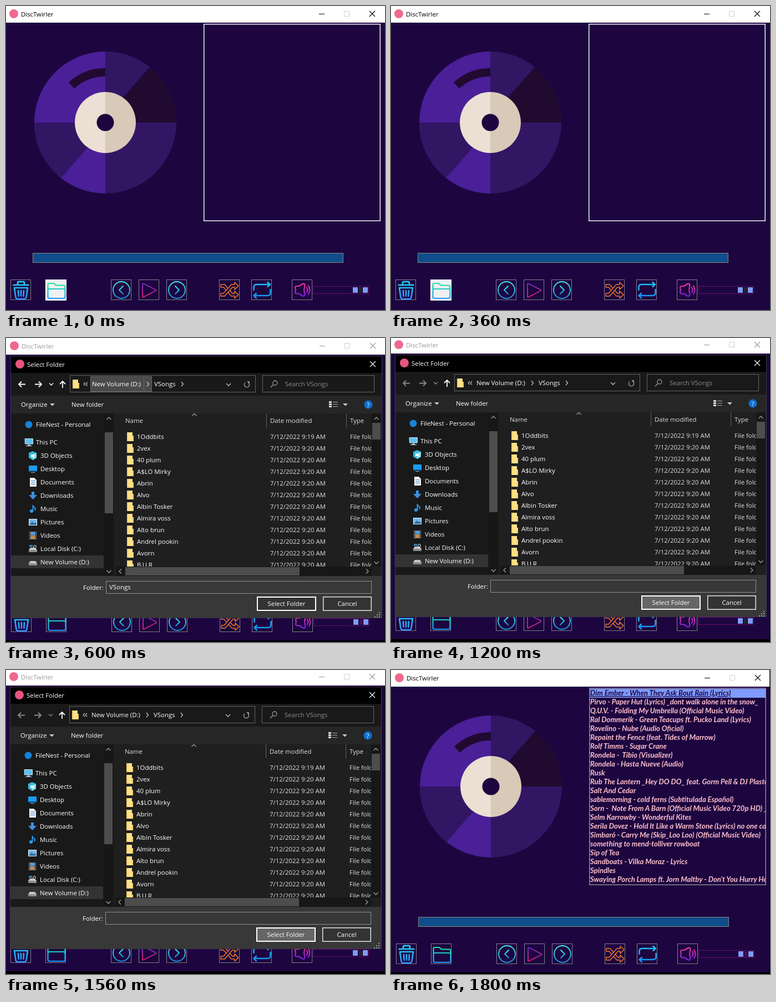
Write an HTML page that moves like this. It is 683 by 548 pixels and loops after 2.4 s.

```html
<!DOCTYPE html>
<html lang="en">
<head>
<meta charset="utf-8">
<title>Disc player</title>
<style>
html, body { margin: 0; width: 100%; height: 100%; overflow: hidden; background: #1d0640; }
svg { display: block; width: 683px; height: 548px; }
text { font: 11.4px "Open Sans", "Noto Sans", sans-serif; white-space: pre; }
.song { font: italic bold 13.1px Lato, "Open Sans", sans-serif; fill: #ffc0cb; }
</style>
</head>
<body>
<svg id="stage" viewBox="0 0 683 548"></svg>
<script>
const BG = '#1d0640', APP = 'DiscTwirler', DIR = 'VSongs';

const rect = (x, y, w, h, fill, more = '') =>
  `<rect x="${x}" y="${y}" width="${w}" height="${h}" fill="${fill}" ${more}/>`;
const box = (x, y, w, h, fill, stroke, sw = 1, more = '') =>
  rect(x + sw / 2, y + sw / 2, w - sw, h - sw, fill, `stroke="${stroke}" stroke-width="${sw}" ${more}`);
const text = (x, y, s, fill = '#fff', more = '') =>
  `<text x="${x}" y="${y}" fill="${fill}" ${more}>${s.replace(/&/g, '&amp;')}</text>`;
const line = (d, stroke = '#fff', w = 1, more = '') =>
  `<path d="${d}" fill="none" stroke="${stroke}" stroke-width="${w}" ${more}/>`;
const shape = (d, fill, more = '') => `<path d="${d}" fill="${fill}" ${more}/>`;
const disc = (x, y, r, fill, more = '') => `<circle cx="${x}" cy="${y}" r="${r}" fill="${fill}" ${more}/>`;
const group = (id, ...parts) => `<g id="${id}">${parts.join('')}</g>`;
const grad = (id, a, b, dir = 'x2="0" y2="1"') =>
  `<linearGradient id="${id}" ${dir}><stop stop-color="${a}"/><stop offset="1" stop-color="${b}"/></linearGradient>`;
const round = 'stroke-linecap="round" stroke-linejoin="round"';

const defs = '<defs>' +
  grad('aqua', '#22d8ee', '#2f8dff') +
  grad('mint', '#1fe8a0', '#1b9cff') +
  grad('ring', '#45efe6', '#1c8fe2') +
  grad('plum', '#7430cc', '#e8206c') +
  grad('fire', '#ee4a2c', '#f9a826', 'x2="1" y2="1"') +
  grad('sky', '#1fc4f4', '#1590ee') +
  grad('rose', '#f5358e', '#7a1fe0') +
  '<clipPath id="songClip"><rect x="357" y="34" width="317" height="352"/></clipPath>' +
  '<clipPath id="rowClip"><rect x="198" y="164" width="461" height="248"/></clipPath></defs>';

// Record
const CX = 179, CY = 210;
const polar = (r, a) => {
  const t = a * Math.PI / 180;
  return `${(CX + r * Math.cos(t)).toFixed(2)} ${(CY + r * Math.sin(t)).toFixed(2)}`;
};
const sector = (r, a, b, fill, r0 = 0) => shape(
  `M${polar(r0, a)}L${polar(r, a)}A${r} ${r} 0 0 1 ${polar(r, b)}L${polar(r0, b)}` +
  (r0 ? `A${r0} ${r0} 0 0 0 ${polar(r0, a)}` : '') + 'Z', fill);
const wedge = (fill, turn) => shape('M179 210L211 164.500L259 110A128 128 0 0 1 307 210Z', fill,
  `transform="rotate(${turn} ${CX} ${CY})"`);

function record() {
  const lilac = '#4a1f98', violet = '#311664', dark = '#200a30';
  return sector(128, 0, 90, violet) + sector(128, 90, 180, lilac) +
    sector(128, 180, 270, lilac) + sector(128, 270, 360, violet) +
    wedge(dark, 0) + wedge(violet, 180) +
    sector(98, 227.5, 270, dark, 83) +
    sector(55, 90, 270, '#ecdfd3') + sector(55, -90, 90, '#d9c9b8') + disc(CX, CY, 15.5, BG);
}

// Player controls
const frame = x => box(x, 493, 37, 37, BG, '#887f96') + line(`M${x + 1} 528.5H${x + 35.5}V494`, '#0c0220');
const ring = (x, s) => disc(x, 512, 15, 'none', 'stroke="url(#ring)" stroke-width="2"') +
  line(`M${x - 3 * s} 505l${7 * s} 7l${-7 * s} 7`, 'url(#ring)', 2, round);
const shuffleArm = (more = '') => shape(
  'M387 523H394L408 507H412V511L419 504.5L412 498V502H406L392 518H387Z', BG,
  `stroke="url(#fire)" stroke-width="1.4" stroke-linejoin="round" ${more}`);

function controls() {
  return [8, 71, 189, 239, 289, 384, 442, 515].map(frame).join('') +
    group('hot', box(71, 493, 38, 38, '#f0f0f0', '#fff')) +
    line('M13.5 503H40.5M21 503V499Q21 497 23 497H31Q33 497 33 499V503M15 508H39L36.5 525Q36 528 33 528H21Q18 528 17.5 525L15 508M22 513L22.6 523M27 513V523M32 513L31.4 523',
      'url(#aqua)', 2.6, round) +
    line('M75.5 510V502.5Q75.5 500 78 500H86L90 503.5H103.5Q106.5 503.5 106.5 506.5V524Q106.5 527 103.5 527H78.5Q75.5 527 75.5 524V512Q75.5 510 78 510H103Q106 510 106.3 512',
      'url(#mint)', 2.2, round) +
    ring(208, -1) + ring(308, 1) +
    line('M246 501.5Q246 499.5 248 500.5L269.5 511.5Q271 512.5 269.5 513.5L248 524.5Q246 525.5 246 523.5Z', 'url(#plum)', 1.9, round) +
    shuffleArm('transform="matrix(1 0 0 -1 0 1025)"') + shuffleArm() +
    line('M446.5 512V507Q446.5 502 451.5 502H475.5M471.5 498L476 502L471.5 506M476.5 511V517Q476.5 522 471.5 522H446.5M451 518L446.5 522L451 526.5',
      'url(#sky)', 2.5, round) +
    line('M524 505H528L534 501Q538.5 499.5 538.5 504L537 512L538.5 519Q538.5 524 534 522.5L528 518.5H524Q521 518.5 521 515.5L522 512L521 508Q521 505 524 505M542 507.5Q545 512 542 516M545 504.5Q550 512 545 519.5',
      'url(#rose)', 2.2, round) +
    box(553, 505, 101, 14, BG, '#6e0a70') +
    rect(624, 506, 29, 12, '#12042a') + rect(625, 507, 9, 10, '#7f9bff') + rect(643, 507, 9, 10, '#7f9bff') +
    group('grip', line('M636.5 507V517M638.5 507V517M640.5 507V517', 'inherit'));
}

const SONGS = `Dim Ember - When They Ask Bout Rain (Lyrics)
Pirvo - Paper Hut (Lyrics) _dont walk alone in the snow_
Q.U.V. - Folding My Umbrella (Official Music Video)
Ral Dommerik - Green Teacups ft. Pucko Land (Lyrics)
Rovelino - Nube (Audio Oficial)
Repaint the Fence (feat. Tides of Marrow)
Rolf Timms - Sugar Crane
Rondela -  Tibio (Visualizer)
Rondela - Hasta Nueve (Audio)
Rusk
Rub The Lantern _Hey DO DO_ feat. Gorm Pell & DJ Plaster (Official)
Salt And Cedar
sablemorning - cold ferns (Subtitulada Español)
Sorn -  Note From A Barn (Official Music Video 720p HD) _ Lyrics
Selm Karrowby - Wonderful Kites
Serila Dovez - Hold It Like a Warm Stone (Lyrics) no one can
Simbaró - Carry Me (Skip_Loo Loo) (Official Music Video)
something to mend-tolliver rowboat
Sip of Tea
Sandboats - Vilka Moraz - Lyrics
Spindles
Swaying Porch Lamps ft. Jorn Maltby - Don't You Hurry Home`.split('\n');

const songs = () => '<g clip-path="url(#songClip)">' + rect(358, 34, 316, 16, '#7f9bff') +
  SONGS.map((s, i) => text(358, 46 + 16 * i, s, '', 'class="song"' +
    (i ? '' : ` style="fill:${BG};text-decoration:underline"`)) +
    (i ? rect(357, 36 + 16 * i, 1, 3, '#c795a8') : '')).join('') + '</g>';

const player = () => group('win',
  rect(-2, -2, 690, 560, BG), rect(-2, -2, 690, 32, '#fff'),
  disc(14, 14, 8, '#f0698c'),
  group('caption', text(27, 19, APP, 'inherit')),
  line('M609.5 9.5H618.5V18.5H609.5Z', '#cfcfcf'),
  group('buttons', line('M564 14.5H574M655 9L665 19M665 9L655 19', 'inherit', 1.1)),
  record(),
  group('list', rect(356.75, 32.75, 317.5, 354.5, 'none', 'stroke-width="1.5"')),
  group('songs', songs()),
  box(48, 445, 560, 18, '#104e8b', '#86807c'),
  controls(),
  group('edge', rect(-2, 545, 690, 8, '#000')));

// Folder dialog
const tri = (x, y) => shape(`M${x} ${y}h9l-4.5 4.5z`, '#c8c8c8');
const caret = (x, y, dx, dy, c = '#9a9a9a', w = 1.4) => dx
  ? line(`M${x} ${y - 4}l${dx} 4l${-dx} 4`, c, w)
  : line(`M${x - 4} ${y}l4 ${dy}l4 ${-dy}`, c, w);
const folder = (x, y) => shape(`M${x} ${y}h10v6h2v10h-12z`, '#ffe08a') +
  rect(x, y, 2, 16, '#fbd267') + rect(x + 10, y + 7, 2, 9, '#f5cf62');

const icons = {
  pc: y => rect(34, y - 7, 15, 10, '#5cc0f0') + line(`M34 ${y - 6.5}H48.5V${y + 3}H34.5Z`, '#cfe4ee') +
    rect(39, y + 4, 5, 2, '#9ab') + rect(36, y + 6, 11, 1, '#cde'),
  cube: y => shape(`M48 ${y - 8}l7 3v9l-7 4l-7-4v-9z`, '#35b8d8') +
    shape(`M48 ${y - 2}l7-3v9l-7 4z`, '#8be4f2') + rect(45, y - 2, 6, 5, '#e6fbff'),
  desk: y => rect(41, y - 6, 15, 11, '#1d9bf0') + rect(41, y + 3, 15, 2, '#0d5fa8') + rect(45, y + 6, 7, 1, '#8bc'),
  doc: y => shape(`M43 ${y - 8}h8l4 4v12h-12z`, '#f2f2f2') +
    line(`M45 ${y - 2.5}h8M45 ${y + .5}h8M45 ${y + 3.5}h8`, '#4a8fd0'),
  down: y => shape(`M46 ${y - 7}h5v6h5l-7.5 8l-7.5-8h5z`, '#3f8fe0'),
  note: y => disc(46, y + 4, 3, '#2a9df4') + line(`M48.5 ${y + 4}V${y - 7}Q49 ${y - 3} 52 ${y - 2}Q54 ${y} 52 ${y + 3}`, '#2a9df4', 1.8),
  pic: y => rect(41, y - 6, 15, 12, '#e8f2f8') + rect(42, y - 5, 13, 10, '#6fb8ea') +
    shape(`M42 ${y + 5}l5-6l4 3l2-2l2 3v2z`, '#2f6c9c'),
  film: y => rect(42, y - 7, 13, 14, '#707a86') + rect(45, y - 6, 7, 5, '#4d9be0') + rect(45, y + 1, 7, 5, '#d08a3c') +
    line(`M43.5 ${y - 6}v12M53.5 ${y - 6}v12`, '#111', 1, 'stroke-dasharray="2 1"'),
  drive: y => shape(`M44 ${y - 2}h9l3 4v4h-15v-4z`, '#c9c9c9') + rect(41, y + 2, 15, 4, '#8c8c8c') + rect(52, y + 3, 2, 1, '#3f6'),
  disk: y => icons.drive(y) + line(`M43.5 ${y - 7}v4M46.5 ${y - 7}v4`, '#3ab0f0', 2) + line(`M50 ${y - 2}v-3q2-3 4 0v3`, '#ddd', 1.2)
};
const TREE = [['pc', 'This PC'], ['cube', '3D Objects'], ['desk', 'Desktop'], ['doc', 'Documents'],
  ['down', 'Downloads'], ['note', 'Music'], ['pic', 'Pictures'], ['film', 'Videos'],
  ['disk', 'Local Disk (C:)'], ['drive', 'New Volume (D:)']];
const FOLDERS = ['1Oddbits', '2vex', '40 plum', 'A$LO Mirky', 'Abrin', 'Alvo', 'Albin Tosker',
  'Almira voss', 'Alto brun', 'Andrel pookin', 'Avorn', 'B.U.R'];

const nav = () => rect(9, 63, 668, 41, '#191919') +
  group('arrows',
    line('M35 83.5H23M28 78.5L23 83.5L28 88.5', 'inherit', 1.8),
    line('M52 83.5H64M59 78.5L64 83.5L59 88.5', 'inherit', 1.8),
    line('M78 81.5l3.5 3.5l3.5-3.5', 'inherit', 1.5)) +
  line('M102 90V78M97 83L102 78L107 83', '#fff', 1.8) +
  box(115, 67, 335, 31, '#191919', '#646464') + folder(120, 75) +
  group('crumb', box(152, 69, 97, 28, '#4a4a4a', '#666'), box(248, 69, 15, 28, '#4a4a4a', '#666')) +
  line('M143 80l-3 3l3 3M147 80l-3 3l3 3', '#ccc', 1.1) +
  text(155, 87, 'New Volume (D:)') + caret(254, 83, 3.5, 0, '#ccc', 1.2) +
  text(267, 87, DIR) + caret(316, 83, 3.5, 0, '#ccc', 1.2) +
  caret(401, 82, 0, 4, '#aaa', 1.7) +
  line('M431 80.5A4.6 4.6 0 1 0 437 80.5', '#999', 1.4) + shape('M434 78h5v5z', '#999') +
  box(462, 67, 202, 31, '#191919', '#646464') +
  disc(485, 81, 4, 'none', 'stroke="#999" stroke-width="1.3"') + line('M482 84l-5 5', '#999', 1.4) +
  text(503, 87, 'Search ' + DIR, '#8d8d8d');

const tools = () => rect(9, 104, 668, 32, '#262626') +
  text(27, 124, 'Organize') + tri(79, 118) + text(118, 124, 'New folder') +
  [114, 118, 122].map(y => rect(582, y, 5, 3, '#ddd') + rect(589, y + 1, 9, 1, '#aaa')).join('') +
  tri(607, 118) + disc(653, 120, 7.5, '#0f6fd0') +
  text(653, 124.5, '?', '#fff', 'text-anchor="middle" font-weight="bold"');

const tree = () => rect(9, 136, 186, 293, '#191919') + rect(9, 392, 167, 23, '#333') +
  disc(41, 156, 6.5, '#1683d8') + text(54, 160, 'FileNest - Personal') +
  TREE.map(([icon, name], i) => {
    const y = 188 + 24 * i;
    return icons[icon](y) + text(i ? 62 : 54, y + 4, name);
  }).join('') +
  rect(177, 136, 17, 293, '#171717') + rect(178, 170, 15, 146, '#4d4d4d') +
  caret(185.5, 147, 0, -4) + caret(185.5, 419, 0, 4);

const files = () => rect(195, 136, 482, 293, '#1f1f1f') +
  text(215, 153, 'Name', '#dedede') + caret(339.5, 140, 0, -3.5, '#aaa', 1.1) +
  text(476, 153, 'Date modified', '#dedede') + text(620, 153, 'Type', '#dedede') +
  line('M469.5 136V161M613.5 136V161', '#636363') +
  '<g clip-path="url(#rowClip)">' + FOLDERS.map((name, i) => {
    const y = 178 + 21 * i;
    return folder(218, y - 8) + text(236, y + 4, name) +
      text(476, y + 4, `7/12/2022 9:${i ? 20 : 19} AM`, '#dedede') + text(620, y + 4, 'File folder', '#dedede');
  }).join('') + '</g>' +
  rect(659, 136, 17, 276, '#171717') + rect(660, 153, 15, 30, '#4d4d4d') +
  caret(667.5, 147, 0, -4) + caret(667.5, 403, 0, 4) +
  rect(198, 412, 461, 17, '#171717') + rect(215, 413, 314, 15, '#4d4d4d') +
  caret(208, 420.5, -4, 0) + caret(649, 420.5, 4, 0);

const footer = () => rect(9, 429, 668, 75, '#383838') +
  text(139, 454, 'Folder:') + box(180, 438, 479, 23, '#383838', '#8f8f8f') +
  group('typed', text(186, 453, DIR)) +
  group('ok', box(452, 466, 107, 26, 'inherit', '#fff', 2)) +
  text(505.5, 483, 'Select Folder', '#fff', 'text-anchor="middle"') +
  box(571, 466, 88, 26, '#333', '#e4e4e4', 1.5) +
  text(615, 483, 'Cancel', '#fff', 'text-anchor="middle"') +
  [[672, 494], [668, 498], [672, 498], [664, 502], [668, 502], [672, 502]].map(([x, y]) => rect(x, y, 2, 2, '#a0a0a0')).join('');

const dialog = () => group('dialog',
  box(8, 32, 670, 473, '#000', '#3c3a44'),
  rect(9, 33, 668, 30, '#000'), disc(25, 47, 8, '#e8557f'), text(38, 52, 'Select Folder'),
  line('M656 42L666 52M666 42L656 52', '#fff', 1.2),
  nav(), tools(), tree(), files(), footer());

document.getElementById('stage').innerHTML = defs + player() + dialog() +
  group('side', rect(682, 30, 1, 518, '#000')) + group('corner', rect(682, 0, 1, 30, '#000'));

// One value per 600 ms step, held until the next
const STEPS = [
  ['win', 'transform', 'none', 'translate(1px,0)', 'translate(0,-2px)', 'translate(1px,0)'],
  ['dialog', 'transform', 'none', 'none', 'translate(-1px,-2px)', 'none'],
  ['dialog', 'opacity', 0, 1, 1, 0],
  ['songs', 'opacity', 0, 0, 0, 1],
  ['edge', 'opacity', 0, 1, 1, 1],
  ['side', 'opacity', 0, 1, 1, 1],
  ['corner', 'opacity', 0, 0, 0, 1],
  ['hot', 'opacity', 1, 0, 0, 0],
  ['crumb', 'opacity', 0, 1, 0, 0],
  ['typed', 'opacity', 0, 1, 0, 0],
  ['caption', 'fill', '#000', '#999', '#999', '#000'],
  ['buttons', 'stroke', '#000', '#999', '#999', '#000'],
  ['arrows', 'stroke', '#fff', '#fff', '#8a8a8a', '#fff'],
  ['ok', 'fill', '#333', '#333', '#666', '#333'],
  ['list', 'stroke', '#f4f0f4', '#8a8794', '#8a8794', '#8a8794'],
  ['grip', 'stroke', '#3a3f3a', '#7a1a88', '#3a3f3a', '#7a1a88']
];
for (const [id, prop, ...vals] of STEPS) {
  const keys = [...vals, vals[3]].map((v, i) => ({ offset: i / 4, [prop]: v, easing: 'steps(1, end)' }));
  const anim = document.getElementById(id).animate(keys, { duration: 2400, iterations: Infinity });
  anim.startTime = 0;
}
</script>
</body>
</html>
```
